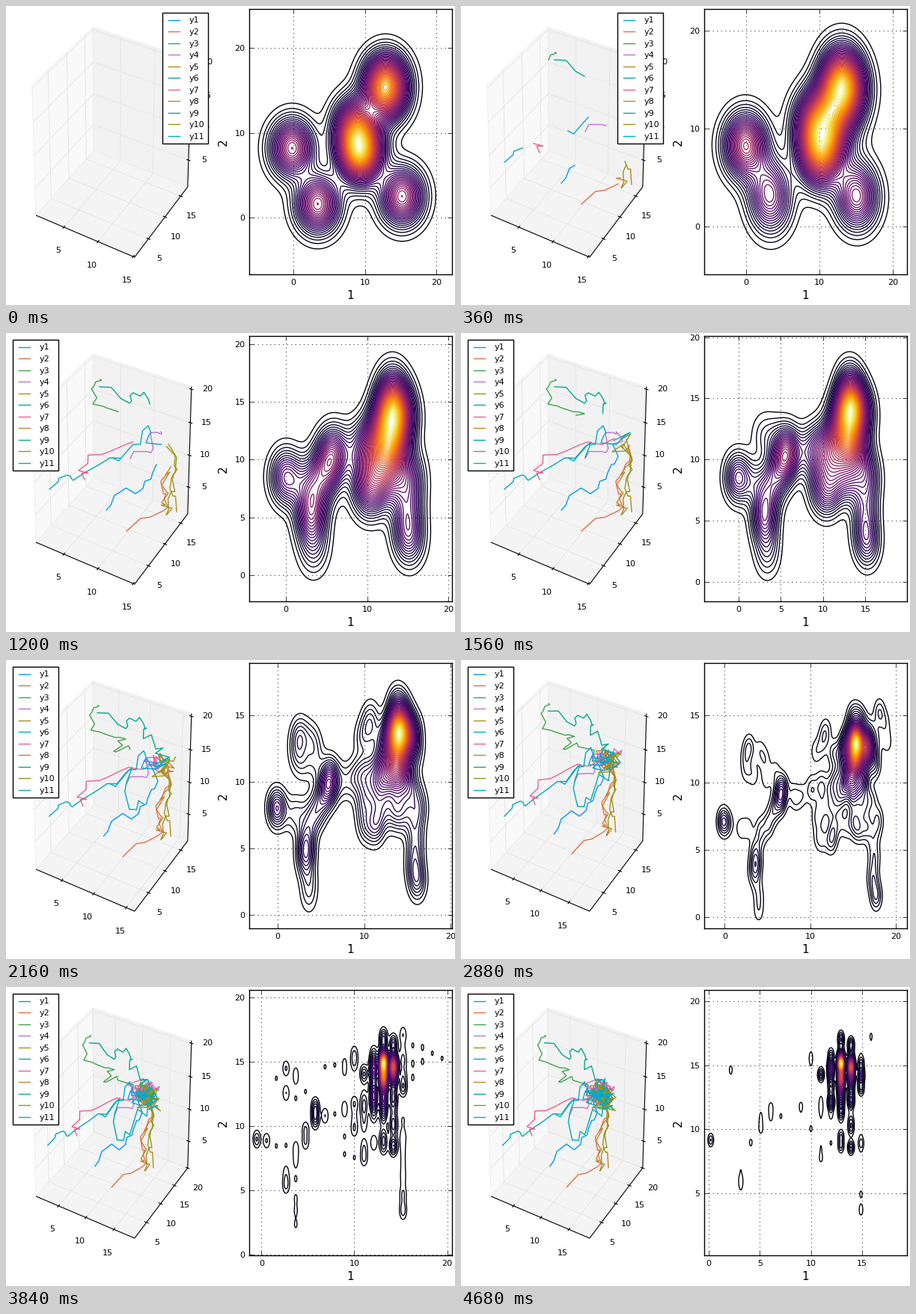
A matplotlib script for the animation above (4800 ms loop, 600 by 400 pixels).

```python
import numpy as np
import matplotlib.pyplot as plt
from matplotlib.animation import FuncAnimation

W, H, FRAMES = 600, 400, 40
plt.rcParams.update({
    "font.family": "DejaVu Sans", "font.size": 8,
    "xtick.direction": "in", "ytick.direction": "in",
    "xtick.top": True, "ytick.right": True,
    "xtick.major.size": 4, "ytick.major.size": 4,
    "xtick.major.width": 0.5, "ytick.major.width": 0.5,
    "xtick.major.pad": 4.4, "ytick.major.pad": 4,
    "axes.linewidth": 1,
})
rng = np.random.default_rng(7)

fig = plt.figure(figsize=(W / 100, H / 100), dpi=100, facecolor="white")
left = fig.add_axes([0, 0, 1, 1])
right = fig.add_axes([325 / W, 1 - 359 / H, 271 / W, 355 / H])


def along(keys, n):
    """n points spread over a polyline, with equal time per segment."""
    keys = np.array(keys, float)
    at = np.linspace(0, len(keys) - 1, n)
    return np.column_stack([np.interp(at, range(len(keys)), c) for c in keys.T])


# ---------- 3D paths ----------
HOME = np.array([219, 143])
STEPS = 3  # steps between two key points
paths = []


def add_path(color, *keys):
    """A jittery walk through key points, then a noisy pull to the swarm."""
    pts = along(keys, STEPS * (len(keys) - 1) + 1)
    bend = np.arange(len(pts)) % STEPS > 0
    pts[bend] += rng.normal(0, 4, (bend.sum(), 2))
    pts = list(pts)
    while len(pts) < FRAMES:
        pts.append(HOME + 0.45 * (pts[-1] - HOME) + rng.normal(0, (9, 8.5)))
    paths.append((color, np.array(pts)))


add_path("#009AFA", (134, 237), (152, 213), (183, 208), (196, 187), (210, 165))
add_path("#E36F47", (161, 265), (210, 238), (214, 215), (207, 198), (228, 170))
add_path("#3EA44E", (126, 62), (117, 72), (116, 95), (146, 104), (165, 108), (148, 124), (171, 122))
add_path("#C371D2", (166, 168), (194, 160), (202, 133), (208, 135), (216, 145))
add_path("#AC8E18", (228, 239), (219, 208), (223, 190), (226, 163))
add_path("#00AAAE", (58, 209), (82, 190), (90, 197), (139, 167), (174, 146), (170, 202), (190, 195))
add_path("#ED5E93", (105, 196), (97, 184), (115, 163), (158, 150), (189, 149))
add_path("#C68225", (215, 243), (213, 230), (214, 212), (213, 190), (229, 170))
add_path("#00A98D", (125, 72), (165, 94), (170, 80), (190, 88), (190, 95), (207, 122))
add_path("#8E971E", (214, 243), (221, 212), (224, 189), (228, 166))
add_path("#00A9CC", (143, 167), (170, 149), (190, 124), (187, 147), (226, 133))


def project(x, y, z):
    """Perspective view of the unit cube (azimuth -60, elevation 30) in pixels."""
    x, y, z = x - 0.5, y - 0.5, z - 0.5
    depth = 10 - (0.433 * x - 0.75 * y + 0.5 * z)
    px = 143 + 1521 * (0.866 * x + 0.5 * y) / depth
    py = 176.8 - 1986 * (-0.25 * x + 0.433 * y + 0.866 * z) / depth
    return px, py


def stroke(points, color, lw, z):
    px, py = zip(*(project(*p) for p in points))
    left.plot(px, py, color=color, lw=lw, zorder=z, solid_capstyle="butt")


def tick(value, lo, span, at, wall, step, offset):
    t = (value - lo) / span
    if not 0 <= t <= 1:
        return
    stroke(wall(t), "0.9", 0.7, 2)
    p = np.array(at(t))
    stroke([p - step, p + step], "black", 0.8, 4)
    px, py = project(*p)
    left.text(px + offset[0], py + offset[1], str(value), ha="center", va="center", zorder=4)


def draw_box(xspan, yspan):
    panes = [("#f9f9f9", [(0, 0, 0), (0, 1, 0), (0, 1, 1), (0, 0, 1)]),
             ("#f2f2f2", [(0, 1, 0), (1, 1, 0), (1, 1, 1), (0, 1, 1)]),
             ("#f4f4f4", [(0, 0, 0), (1, 0, 0), (1, 1, 0), (0, 1, 0)])]
    for color, corners in panes:
        px, py = zip(*(project(*c) for c in corners))
        left.fill(px, py, fc=color, ec="0.93", lw=0.6, zorder=1)
    along_x, along_y = np.array([0.02, 0, 0]), np.array([0, 0.02, 0])
    for value in (5, 10, 15, 20):
        tick(value, 0.8, xspan, lambda t: (t, 0, 0),
             lambda t: [(t, 0, 0), (t, 1, 0), (t, 1, 1)], along_y, (-8, 31.5))
        tick(value, 0.95, yspan, lambda t: (1, t, 0),
             lambda t: [(1, t, 0), (0, t, 0), (0, t, 1)], along_x, (14, 27))
        tick(value, 0.7, 19.7, lambda t: (1, 1, t),
             lambda t: [(0, 0, t), (0, 1, t), (1, 1, t)], along_x, (21, -0.5))
    stroke([(0, 0, 0), (1, 0, 0), (1, 1, 0), (1, 1, 1)], "black", 0.8, 4)


def draw_legend(x, y=9):
    left.fill([x, x + 61, x + 61, x], [y, y, y + 175, y + 175],
              fc="white", ec="black", lw=1, zorder=8)
    for k, (color, _) in enumerate(paths):
        row = y + 9.5 + 15.55 * k
        left.plot([x + 8, x + 23], [row, row], color=color, lw=1, zorder=9)
        left.text(x + 36, row, f"y{k + 1}", va="center_baseline", zorder=9)


def draw_paths(i):
    # the x and y ranges grow in jumps, which pulls the paths back
    xspan = 14.39 if i < 16 else 15.46 if i < 21 else 17.8
    yspan = 16.34 if i < 28 else 19.1
    left.cla()
    left.set(xlim=(0, W), ylim=(H, 0))
    left.axis("off")
    draw_box(xspan, yspan)
    for color, pts in paths:
        u = (pts[:, 0] - 58) / 200
        v = (pts[:, 0] - 40 - 132 * u) / 85
        shown = (pts + np.outer((14.39 / xspan - 1) * u, (132, 56))
                 + np.outer((16.34 / yspan - 1) * v, (74, -92)))
        left.plot(*shown[:i + 1].T, color=color, lw=1, zorder=5)
    draw_legend(209 if i < 7 else 9)
    left.text(460.5, 388, "1", size=11, ha="center", va="center")
    left.text(290, 182, "2", size=11, ha="center", va="center", rotation=90)


# ---------- density ----------
CENTER = np.array([13.2, 14.5])
WEIGHT = 0.4
visits = []


def walk(start, end, n, *keys):
    """Places visited between two steps; the first stays exactly on its key."""
    pts = along(keys, n)
    pts[1:] += rng.normal(0, 0.15, (n - 1, 2))
    visits.extend(np.column_stack([pts, np.linspace(start, end, n)]))


walk(0, 14, 22, (-.2, 8.5), (-.2, 8.6), (3.5, 8), (5.8, 10.4), (5.8, 10.9), (9.5, 10.5), (12, 11))
walk(0, 20, 26, (3.4, 1.9), (3, 4.8), (3.3, 5.4), (3.2, 7), (5, 9.3), (5.6, 11.3),
     (2.2, 12.4), (2.4, 14.4), (4.2, 13.2), (7, 10.2))
walk(0, 13, 14, (15.2, 2.8), (14.8, 3.9), (15, 6.5), (15.3, 9), (13.8, 11))
walk(0, 8, 14, (9.4, 7.4), (10.8, 6.8), (11, 8.5), (13, 8), (12.5, 10), (13.5, 12))
walk(0, 5, 9, (9.2, 8.8), (10.8, 9.5), (11.8, 10.4), (12.5, 12))
walk(0, 5, 8, (8.7, 11.2), (10.2, 11.5), (11.3, 11.6), (12, 13))
walk(0, 3, 4, (12.9, 16.6), CENTER)
walk(0, 6, 6, (12.9, 14.8), (13, 12.5), (14.2, 9.5))
walk(14, 18, 4, (10.2, 15.4), (9, 13.8))
walk(19, 23, 5, (14.8, 15.5), (15.8, 17), (16.2, 14.5))
walk(25, 30, 5, (16, 13.3), (17.4, 15.6), (19.5, 14.7))
walk(26, 30, 4, (6.8, 14.2), (10, 15))
visits = np.array(visits)

# a dense core, a round cloud and a tail hanging below
cloud = rng.normal(CENTER, (1.15, 0.85), (50, 2))
tail = CENTER - np.abs(rng.normal(0, (0, 2.7), (45, 2))) + rng.normal(0, (0.75, 0.2), (45, 2))
swarm = np.vstack([cloud, tail, np.tile(CENTER, (14, 1))])


def bell(i, mid, width):
    return np.exp(-((i - mid) / width) ** 2)


def view(i):
    """Axis limits: an early zoom plus a slow breathing."""
    late = np.sin(np.pi * max(i - 13, 0) / 26) ** 2
    x0 = -6.2 + 0.175 * i - 0.0007 * i * i
    x1 = 19.4 + 2.8 * bell(i, 0, 10) + 2 * late
    y0 = 0.3 - 7 * np.exp(-i / 10) - 0.5 * bell(i, 24, 5.5)
    y1 = 20.9 + 3.7 * np.exp(-i / 3) - 2.3 * bell(i, 21, 8)
    return x0, x1, y0, y1


def field(x, y, gx, gy, i):
    sway = bell(i, 23, 5)
    x = x * (1 + 0.17 * sway)
    y = y - 0.3 + 0.024 * i - 1.8 * sway
    sx = 1.9 / (1 + (i / 13) ** 2)
    sy = 0.08 + 2.05 / (1 + (i / 15) ** 2)
    if i >= 27:  # narrow kernels collapse onto evenly spaced columns
        mix = np.clip((i - 32) / 7, 0, 1)
        gap, shift = 1.05 - 0.07 * mix, -0.5 + 0.7 * mix
        x = np.round((x - shift) / gap) * gap + shift
    kx = np.exp(-0.5 * ((gx - x[:, None]) / sx) ** 2)
    ky = np.exp(-0.5 * ((gy - y[:, None]) / sy) ** 2)
    return ky.T @ kx


def draw_density(i):
    x0, x1, y0, y1 = view(i)
    gx, gy = np.linspace(x0, x1, 220), np.linspace(y0, y1, 240)
    x, y, _ = visits[visits[:, 2] <= i].T
    core = field(*swarm.T, gx, gy, i)
    peak = 0.5 * i * (1 + 0.6 * (i / 39) ** 8)
    z = WEIGHT * field(x, y, gx, gy, i) + peak * core / core.max()

    right.cla()
    right.contour(gx, gy, z / z.max(), levels=np.linspace(0, 1, 52)[1:-1], cmap="inferno",
                  vmin=0, vmax=1, linewidths=1)
    right.set_xticks(np.arange(0, 21, 5 if x1 < 20 else 10))
    right.set_yticks(np.arange(0, 21, 5 if y1 < 21 else 10))
    right.set(xlim=(x0, x1), ylim=(y0, y1))
    right.grid(color="black", lw=0.5, ls=(0, (2, 6)))


def draw(i):
    draw_paths(i)
    draw_density(i)
    return []


anim = FuncAnimation(fig, draw, frames=FRAMES, interval=120, repeat=True, repeat_delay=0)
plt.show()
```
